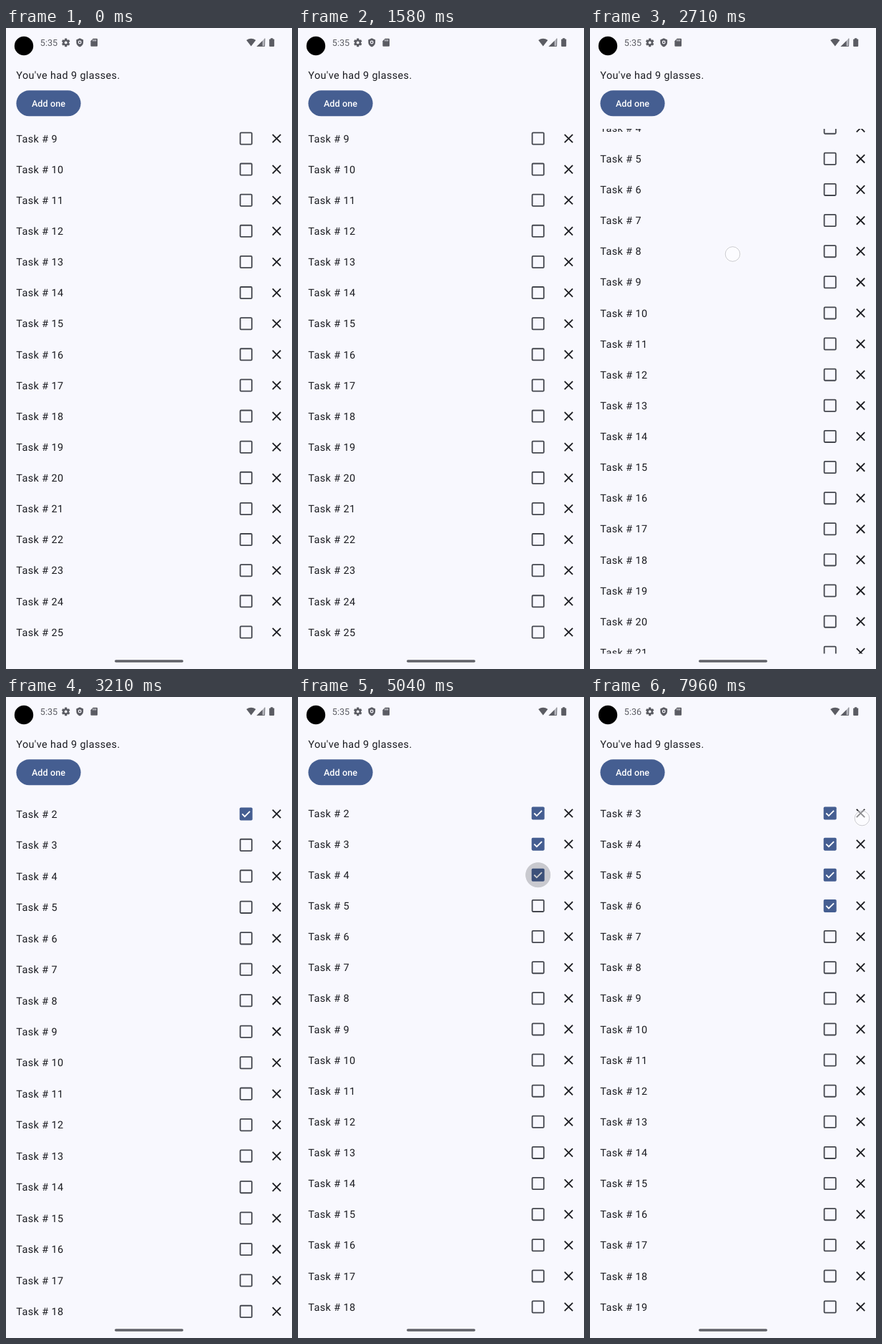
Write an HTML page with a canvas that moves like this. It is 400 px wide and 896 px high and loops after 8 s.

```html
<!DOCTYPE html>
<html lang="en">
<head>
<meta charset="utf-8">
<title>Water counter and tasks</title>
<style>
html, body { margin: 0; width: 100%; height: 100%; overflow: hidden; background: #f8f8fe; }
canvas { display: block; width: 400px; height: 896px; }
</style>
</head>
<body>
<canvas id="stage"></canvas>
<script>
const LOOP = 8000, DP = 0.898, ROW = 43.125, FIRST = 162.5;
const LIST_TOP = 141, LIST_END = 874.5, BOX_X = 335.7, CLOSE_X = 378.5;
const BG = '#f8f8fe', INK = '#1a1b20', BLUE = '#455e91', ICON = '#5b5c63';
const DELETE_AT = 7290, RIPPLE = 730;
const checkedAt = { 2: -1000, 3: 4250, 4: 4750, 5: 5450, 6: 6150 };

const canvas = document.getElementById('stage');
const ctx = canvas.getContext('2d');
const dpr = window.devicePixelRatio || 1;
canvas.width = 400 * dpr;
canvas.height = 896 * dpr;
ctx.textRendering = 'geometricPrecision';

const clamp = v => Math.max(0, Math.min(1, v));
const phase = (t, from, to) => clamp((t - from) / (to - from));

function text(str, x, y, size, color = INK, spacing = 0, weight = 400) {
  ctx.font = `${weight} ${size}px Roboto, sans-serif`;
  ctx.letterSpacing = spacing + 'px';
  ctx.fillStyle = color;
  ctx.fillText(str, x, y);
}

const body = (str, y) => text(str, 16 * DP, y, 16 * DP, INK, 0.4);

function round(x, y, w, h, r, fill) {
  ctx.beginPath();
  ctx.roundRect(x, y, w, h, r);
  ctx.fillStyle = fill;
  ctx.fill();
}

function disc(x, y, r, fill) {
  ctx.beginPath();
  ctx.arc(x, y, r, 0, 7);
  ctx.fillStyle = fill;
  ctx.fill();
}

function shape(d, fill) {
  ctx.fillStyle = fill;
  ctx.fill(new Path2D(d));
}

function line(points, color, width) {
  ctx.beginPath();
  points.forEach(([x, y]) => ctx.lineTo(x, y));
  ctx.strokeStyle = color;
  ctx.lineWidth = width;
  ctx.stroke();
}

// List motion: flick, fling, then the edge stretch relaxing
const dragAt = t => phase(t, 2540, 2710) ** 1.3;

function scrollAt(t) {
  return 309.9 - 199.3 * dragAt(t) - 110.6 * phase(t, 2710, 2783);
}

function stretchAt(t) {
  const rise = phase(t, 2783, 2880);
  return 0.05 * rise * (2 - rise) * (1 - phase(t, 2880, 3380)) ** 1.7;
}

function ripple(y, age) {
  if (age < 0 || age >= RIPPLE) return;
  const r = 18 * (0.6 + 0.4 * phase(age, 0, 150));
  const solid = 0.3 + 0.65 * phase(age, 100, 270);
  const alpha = 0.21 * phase(age, 0, 75) * (1 - phase(age, 450, RIPPLE));
  const glow = ctx.createRadialGradient(BOX_X, y, 0, BOX_X, y, r);
  glow.addColorStop(0, `rgba(26,27,32,${alpha})`);
  glow.addColorStop(solid, `rgba(26,27,32,${alpha})`);
  glow.addColorStop(1, 'rgba(26,27,32,0)');
  disc(BOX_X, y, r, glow);
}

function checkbox(y, age) {
  const x = BOX_X - 9, top = y - 9;
  if (age < 0) {
    ctx.beginPath();
    ctx.roundRect(x + 0.9, top + 0.9, 16.2, 16.2, 1.2);
    ctx.strokeStyle = '#44474e';
    ctx.lineWidth = 1.8;
    ctx.stroke();
    return;
  }
  round(x, top, 18, 18, 1.8, BLUE);
  const p = phase(age, 0, 100);
  const mx = x + 7.2, my = top + 12.6;
  line([[mx - 3.6 * p, my - 3.6 * p], [mx, my], [mx + 7.2 * p, my - 7.2 * p]], '#fff', 1.8);
  ripple(y, age);
}

function cross(y) {
  const a = 5.7;
  line([[CLOSE_X - a, y - a], [CLOSE_X + a, y + a]], INK, 1.8);
  line([[CLOSE_X + a, y - a], [CLOSE_X - a, y + a]], INK, 1.8);
}

function list(t) {
  const first = t < DELETE_AT ? 2 : 3;
  const scroll = scrollAt(t), stretch = stretchAt(t);
  ctx.save();
  ctx.beginPath();
  ctx.rect(0, LIST_TOP, 400, LIST_END - LIST_TOP);
  ctx.clip();
  ctx.translate(0, -40 * stretch);
  ctx.scale(1, 1 + stretch);
  for (let i = 0; i < 26; i++) {
    const y = FIRST + i * ROW - scroll;
    if (y < 110 || y > 900) continue;
    const id = first + i;
    body(`Task # ${id}`, y + 5.2);
    checkbox(y, t - (checkedAt[id] ?? Infinity));
    cross(y);
  }
  ctx.restore();
}

function statusBar(t) {
  disc(25, 25, 13.2, '#000');
  text(t < DELETE_AT ? '5:35' : '5:36', 47.8, 25, 12.6, ICON);

  // Gear
  for (let i = 0; i < 6; i++) {
    ctx.save();
    ctx.translate(83.7, 20.4);
    ctx.rotate(i * Math.PI / 3);
    round(-1.6, -5.8, 3.2, 4, 0.5, ICON);
    ctx.restore();
  }
  disc(83.7, 20.4, 4.3, ICON);
  disc(83.7, 20.4, 1.9, BG);

  // Shield
  shape('M103.2 14.3l4.9 2.1v3.6c0 3-2.1 5.6-4.9 6.4c-2.8-.8-4.9-3.4-4.9-6.4v-3.6z', ICON);
  disc(103.2, 20, 2.4, BG);
  disc(103.2, 20, 1.2, ICON);

  // Memory card
  shape('M121.8 14.8h5.2q1 0 1 1v9q0 1-1 1h-7.6q-1 0-1-1v-6.6z', ICON);
  for (let i = 0; i < 3; i++) round(121.4 + i * 1.9, 16.2, 0.9, 2.2, 0, BG);

  // Wi-Fi, signal, battery
  shape('M336.2 17q6.6-4.6 13.2 0l-6.6 8.6z', ICON);
  shape('M362 14.6v11.2h-11.2z', '#b6b7be');
  shape('M358.6 18v7.8h-7.8z', ICON);
  line([[362, 14.6], [361.6, 25.5], [350.8, 25.5]], ICON, 0.8);
  round(370.1, 14.3, 3.2, 2, 0.3, ICON);
  round(368.2, 15.4, 7, 10.6, 0.9, ICON);
}

function header() {
  body("You've had 9 glasses.", 71);
  round(14.4, 87.3, 90.2, 36, 18, BLUE);
  text('Add one', 35.9, 109.8, 14 * DP, '#fff', 0.1 * DP, 500);
}

function touch(t, from, to, x, y) {
  if (t < from || t >= to) return;
  disc(x, y, 12, 'rgba(255,255,255,0.5)');
  ctx.beginPath();
  ctx.arc(x, y, 10.3, 0, 7);
  ctx.strokeStyle = 'rgba(110,110,120,0.35)';
  ctx.lineWidth = 1;
  ctx.stroke();
}

function touches(t) {
  touch(t, 2500, 2750, 199.5, 165 + 151 * dragAt(t));
  for (let id = 3; id <= 6; id++) {
    const tap = checkedAt[id];
    touch(t, tap - (id === 3 ? 170 : 110), tap, 336.5, 203 + (id - 3) * ROW);
  }
  touch(t, 7130, DELETE_AT, 381.5, 161);
  touch(t, 7790, LOOP, 380.5, 169.5);
}

function draw(t) {
  ctx.setTransform(dpr, 0, 0, dpr, 0, 0);
  ctx.fillStyle = BG;
  ctx.fillRect(0, 0, 400, 896);
  statusBar(t);
  header();
  list(t);
  round(152, 883.2, 96, 3.6, 1.8, '#606168');
  touches(t);
}

const start = performance.now();
function frame() {
  draw((performance.now() - start) % LOOP);
  requestAnimationFrame(frame);
}
frame();
</script>
</body>
</html>
```
